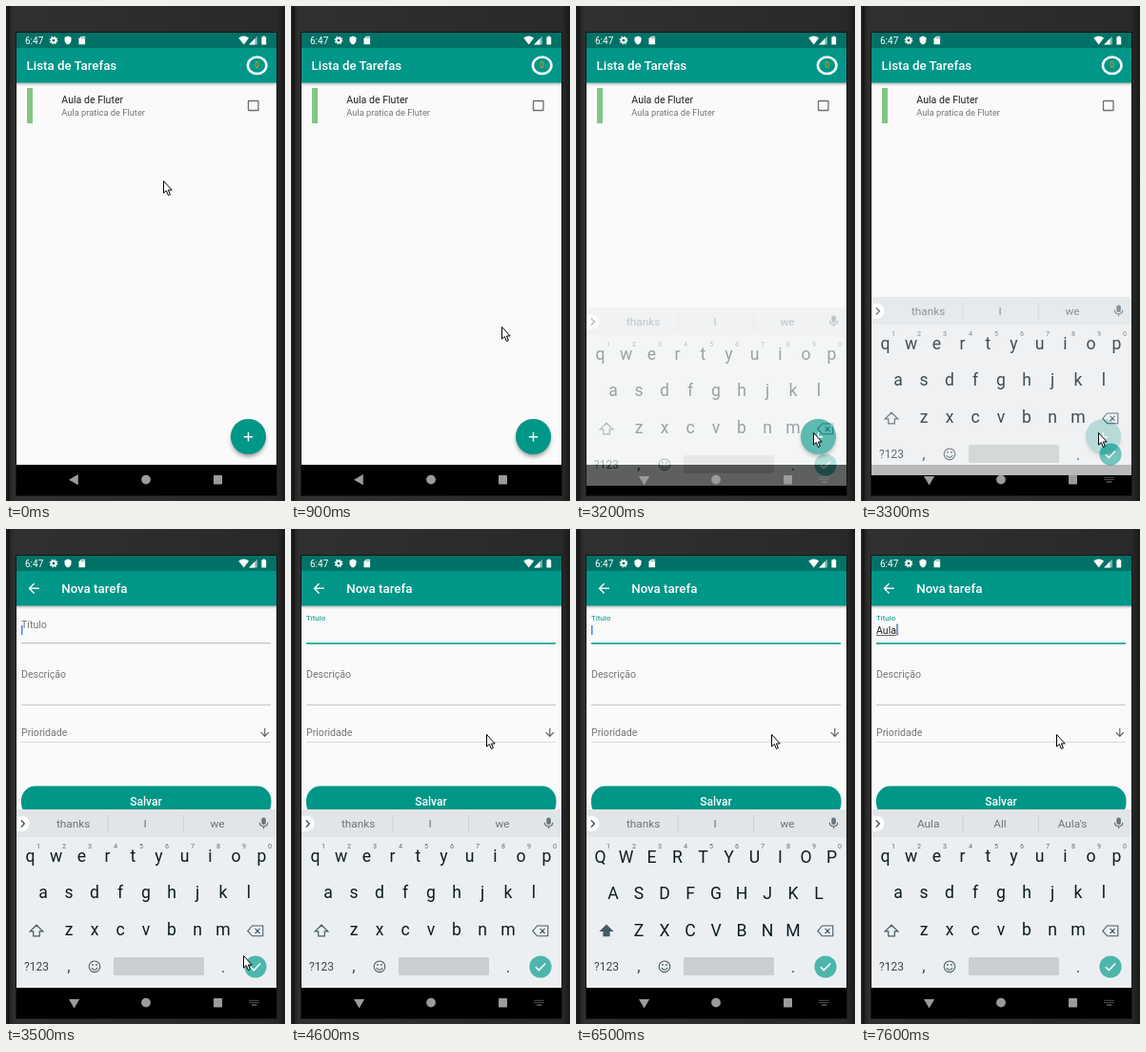
An HTML page for the animation above (8 s loop, 293x519 px).

```html
<!DOCTYPE html>
<html lang="pt">
<head>
<meta charset="utf-8">
<title>Lista de Tarefas</title>
<style>
html, body { margin: 0; width: 100%; height: 100%; overflow: hidden; background: #2a2a2a; }
svg { display: block; width: 100vw; height: 100vh; font-family: Roboto, "Noto Sans", sans-serif; }
.mid { text-anchor: middle; }
.med { font-weight: 500; }
.line { fill: none; stroke-linecap: butt; }
.anim { animation: 8s step-end infinite; }

/* 1% of the loop is 80 ms */
#pointer { animation-name: pointer; }
@keyframes pointer {
  0% { transform: translate(165px, 183px); }
  5% { transform: translate(165px, 183px); animation-timing-function: steps(3, start); }
  8.75% { transform: translate(185px, 237px); animation-timing-function: steps(3, start); }
  12.5% { transform: translate(221px, 336px); animation-timing-function: steps(3, start); }
  16.25% { transform: translate(242px, 392px); animation-timing-function: steps(4, start); }
  21.25% { transform: translate(249px, 447px); }
  50% { transform: translate(249px, 447px); animation-timing-function: steps(5, start); }
  56.25%, 100% { transform: translate(205px, 215px); }
}
#board { animation-name: board; }
@keyframes board {
  0% { opacity: 0; transform: translateY(22px); }
  40% { opacity: .4; transform: translateY(22px); }
  41.25% { opacity: .78; transform: translateY(11px); }
  42.5% { opacity: .95; transform: translateY(3px); }
  43.75%, 100% { opacity: 1; transform: none; }
}
#form { animation-name: form; }
@keyframes form {
  0% { opacity: 0; transform: translateY(20px); }
  42.5% { opacity: .5; transform: translateY(20px); }
  43.75%, 100% { opacity: 1; transform: none; }
}
.back-up { animation-name: before-board; }
.back-down { animation-name: after-board; }
@keyframes before-board { 0% { opacity: 1; } 40%, 100% { opacity: 0; } }
@keyframes after-board { 0% { opacity: 0; } 40%, 100% { opacity: 1; } }
.idle { animation-name: before-focus; }
.focus { animation-name: after-focus; }
@keyframes before-focus { 0% { opacity: 1; } 45%, 100% { opacity: 0; } }
@keyframes after-focus { 0% { opacity: 0; } 45%, 100% { opacity: 1; } }
.lower { animation-name: lower; }
.upper { animation-name: upper; }
@keyframes lower { 0% { opacity: 1; } 81.25% { opacity: 0; } 82.5%, 100% { opacity: 1; } }
@keyframes upper { 0% { opacity: 0; } 81.25% { opacity: 1; } 82.5%, 100% { opacity: 0; } }
#caret { animation-name: caret; }
@keyframes caret {
  0%, 51.25%, 63.75%, 75% { opacity: 1; }
  45%, 57.5%, 70%, 82.5%, 100% { opacity: 0; }
}
#tallcaret { animation-name: tallcaret; }
@keyframes tallcaret {
  0% { opacity: 0; transform: translateX(23px); }
  82.5% { opacity: 1; transform: translateX(23px); }
  83.75% { opacity: 1; transform: translateX(29px); }
  90% { opacity: 0; transform: translateX(29px); }
  92.5% { opacity: 1; transform: translateX(31.6px); }
  95%, 100% { opacity: 1; transform: translateX(37.4px); }
}
.t1 { animation-name: t1; }
.t2 { animation-name: t2; }
.t3 { animation-name: t3; }
.t4 { animation-name: t4; }
@keyframes t1 { 0% { opacity: 0; } 82.5% { opacity: 1; } 83.75%, 100% { opacity: 0; } }
@keyframes t2 { 0% { opacity: 0; } 83.75% { opacity: 1; } 92.5%, 100% { opacity: 0; } }
@keyframes t3 { 0% { opacity: 0; } 92.5% { opacity: 1; } 95%, 100% { opacity: 0; } }
@keyframes t4 { 0% { opacity: 0; } 95%, 100% { opacity: 1; } }
.hints { animation-name: hints; }
@keyframes hints { 0% { opacity: 1; } 92.5%, 100% { opacity: 0; } }
</style>
</head>
<body>
<svg viewBox="0 0 293 519" preserveAspectRatio="none">
  <defs>
    <clipPath id="screen"><rect x="11" y="28" width="273" height="485"/></clipPath>
    <linearGradient id="bezel"><stop stop-color="#1c1c1c"/><stop offset=".03" stop-color="#303030"/><stop offset=".97" stop-color="#292929"/><stop offset="1" stop-color="#1a1a1a"/></linearGradient>
    <linearGradient id="drop" x2="0" y2="1"><stop stop-opacity=".28"/><stop offset="1" stop-opacity="0"/></linearGradient>
    <filter id="soft" x="-40%" y="-40%" width="180%" height="180%"><feGaussianBlur stdDeviation="2.2"/></filter>
  </defs>

  <rect width="293" height="519" fill="url(#bezel)"/>
  <rect x="2" width="1.5" height="519" fill="#131313"/>
  <rect x="10" y="27" width="275" height="487" fill="#161616"/>

  <g clip-path="url(#screen)">
    <rect x="11" y="44" width="273" height="437" fill="#fafafa"/>

    <!-- task list -->
    <rect x="11" y="80" width="273" height="4" fill="url(#drop)"/>
    <rect x="11" y="44" width="273" height="36.5" fill="#009688"/>
    <text class="med" x="21.6" y="67" font-size="13.3" fill="#fff">Lista de Tarefas</text>
    <ellipse class="line" cx="263.7" cy="62.3" rx="9.8" ry="8.8" stroke="#fff" stroke-width="2.5"/>
    <path d="M263.5 52.5v2" stroke="#b9dcd8"/>
    <text class="mid" x="263.7" y="65.2" font-size="8.4" fill="#ff9800">0</text>
    <rect x="22" y="86" width="6" height="37" fill="#81c784"/>
    <text x="58.3" y="102" font-size="10.6" fill="#212121">Aula de Fluter</text>
    <text x="58.3" y="115.2" font-size="9.3" fill="#757575">Aula pratica de Fluter</text>
    <rect class="line" x="254.5" y="99.5" width="10.5" height="10" rx=".6" stroke="#6f6f6f" stroke-width="1.3"/>
    <circle cx="254.5" cy="454.5" r="18" opacity=".38" filter="url(#soft)"/>
    <circle cx="254.5" cy="451.5" r="18.6" fill="#009688"/>
    <path d="M249.8 451.7h9.4M254.5 447v9.4" stroke="#fff" stroke-width="1.4"/>

    <!-- new task -->
    <g id="form" class="anim">
      <rect x="11" y="44" width="273" height="437" fill="#fafafa"/>
      <rect x="11" y="80" width="273" height="4" fill="url(#drop)"/>
      <rect x="11" y="44" width="273" height="36.5" fill="#009688"/>
      <path class="line" d="M34.8 62.3h-10M29.6 57.2l-5.1 5.1 5.1 5.1" stroke="#fff" stroke-width="1.4"/>
      <text class="med" x="58.2" y="67" font-size="13.3" fill="#fff">Nova tarefa</text>
      <g class="anim idle">
        <text x="16" y="104" font-size="10.6" fill="#757575">Título</text>
        <path d="M16 119.7h262" stroke="#b4b4b4"/>
      </g>
      <g class="anim focus">
        <text x="16" y="96" font-size="8" fill="#009688">Título</text>
        <path d="M16 120h262" stroke="#009688" stroke-width="1.6"/>
      </g>
      <g font-size="10.6" fill="#757575">
        <text x="16" y="155.6">Descrição</text>
        <text x="16" y="216.8">Prioridade</text>
      </g>
      <path d="M16 184.5h262" stroke="#c6c6c6"/>
      <path d="M16 223.5h262" stroke="#dadada"/>
      <path class="line" d="M271.8 208.8v8.4M267.7 213.2l4.1 4.1 4.1-4.1" stroke="#616161" stroke-width="1.2"/>
      <rect x="16" y="269.5" width="262.5" height="33" rx="15" fill="#009688"/>
      <text class="mid med" x="147" y="289.6" font-size="12" fill="#fff">Salvar</text>
      <g id="typed" font-size="10.6" fill="#212121"></g>
      <rect id="caret" class="anim" x="16" y="101" width="1.5" height="10" fill="#4285f4"/>
      <rect id="tallcaret" class="anim" x="0" y="99.5" width="1.2" height="12" fill="#34508a"/>
    </g>

    <!-- status bar -->
    <rect x="11" y="28" width="273" height="16" fill="#007166"/>
    <text x="20" y="39.6" font-size="10" fill="#fff">6:47</text>
    <g fill="#fff">
      <circle class="line" cx="50" cy="36" r="2.4" stroke="#fff" stroke-width="1.8"/>
      <circle class="line" cx="50" cy="36" r="3.8" stroke="#fff" stroke-width="1.2" stroke-dasharray="1.5 1.48"/>
      <path d="M65 31.6l3.5 1.5v2.7q0 3.3-3.5 4.8-3.5-1.5-3.5-4.8v-2.7z"/>
      <path d="M79 31.7h4.1v8.5h-6.6v-6z"/>
      <path d="M79.4 32.4v1.8M80.9 32.4v1.8M82.3 32.4v1.8" stroke="#007166" stroke-width=".6"/>
      <path d="M244.3 33.6q5.4-4.2 10.8 0l-5.4 6.8z"/>
      <path d="M264 31.6v8.8h-8.8z" opacity=".45"/>
      <path d="M261.5 34.1v6.3h-6.3z"/>
      <path d="M268.4 32.4h1.4v-1h2v1h1.4v8.2h-4.8z"/>
    </g>

    <rect x="11" y="481" width="273" height="32"/>

    <!-- keyboard -->
    <g id="board" class="anim">
      <rect x="11" y="294" width="273" height="187" fill="#eceff1"/>
      <rect x="11" y="294" width="273" height="29" fill="#e1e5e8"/>
      <path d="M107 300v18M186.5 300v18" stroke="#c6cccf" stroke-width=".8"/>
      <path d="M11 301h5.5a8 8 0 0 1 0 16H11z" fill="#fff"/>
      <path class="line" d="M15.8 305.4l3.5 3.6-3.5 3.6" stroke="#37474f" stroke-width="1.3"/>
      <g fill="none" stroke="#69767d" stroke-width="1.2">
        <rect x="268.9" y="303" width="3.4" height="6.4" rx="1.7" fill="#69767d"/>
        <path d="M266.4 307.8q0 4 4.2 4t4.2-4M270.6 311.8v2.4"/>
      </g>
      <g id="hints" class="mid" font-size="11.8" fill="#6b747a"></g>
      <g id="digits" class="mid" font-size="7.2" fill="#5f6d75"></g>
      <g id="keys" class="mid" font-size="17.6" fill="#0c1c23"></g>
      <path class="anim lower line" d="M32 415.2l6.8 6.6h-3.5v5h-6.6v-5h-3.5z" stroke="#455a64" stroke-width="1.2"/>
      <path class="anim upper" d="M32 414.5l7.6 7.6h-4v5.2h-7.2v-5.2h-4z" fill="#455a64"/>
      <g class="line" stroke="#455a64" stroke-width="1.1">
        <path d="M258.6 416h11.2v10.8h-11.2l-4.8-5.4zM261.6 418.8l5 5.2M266.6 418.8l-5 5.2"/>
        <circle cx="93" cy="458.8" r="5.8"/>
        <path d="M89.8 460.2q3.2 4.2 6.4 0"/>
      </g>
      <path d="M91 456v1.8M95 456v1.8" stroke="#455a64" stroke-width="1.4"/>
      <g class="mid" fill="#37474f">
        <text x="32" y="463" font-size="12">?123</text>
        <text x="66" y="464" font-size="17">,</text>
        <text x="228" y="465" font-size="17">.</text>
      </g>
      <rect x="113" y="449" width="95" height="19" rx="1.5" fill="#cbced0"/>
      <circle cx="262" cy="459" r="11.6" fill="#4db6ac"/>
      <path class="line" d="M256.9 459.2l3.4 3.4 6.9-7.1" stroke="#fff" stroke-width="1.5"/>
    </g>

    <!-- navigation bar -->
    <g fill="#9b9b9b">
      <path class="anim back-up" d="M66 496.7l9.8-5.6v11.2z"/>
      <path class="anim back-down" d="M66 493h11.2l-5.6 9.6z"/>
      <circle cx="147" cy="496.6" r="4.9"/>
      <rect x="218" y="492" width="9" height="9.4" rx=".6"/>
      <g class="anim back-down line" stroke="#8a8a8a" stroke-width="1">
        <path d="M255.5 494.3h10.5M255.5 496.6h10.5" stroke-dasharray="1.2 .9"/>
        <path d="M258 499h5.4"/>
      </g>
    </g>
  </g>

  <path id="pointer" class="anim" d="M.5.5v12.6l2.8-2.6 2.1 5 2-.9-2-4.6h3.8z" fill="#fff" stroke="#000" stroke-linejoin="round"/>
</svg>
<script>
const byId = id => document.getElementById(id);
const label = (x, y, str, cls = '') => `<text x="${x}" y="${y}" class="${cls}">${str}</text>`;

const rows = [['qwertyuiop', 25.5, 349], ['asdfghjkl', 39, 387], ['zxcvbnm', 66, 426]];
const step = 27;
const keys = (upper, drop) => rows.map(([row, x, y]) =>
  [...(upper ? row.toUpperCase() : row)].map((c, i) => label(x + i * step, y + drop, c)).join('')).join('');
byId('keys').innerHTML =
  `<g class="anim lower">${keys(false, 0)}</g><g class="anim upper">${keys(true, 1)}</g>`;

byId('digits').innerHTML =
  [...'1234567890'].map((d, i) => label(34 + i * step, 335, d)).join('');

const hints = (words, cls) => words.map((w, i) => label([70.7, 146, 222][i], 313, w, 'anim ' + cls)).join('');
byId('hints').innerHTML =
  hints(['thanks', 'I', 'we'], 'hints') + hints(['Aula', 'All', "Aula's"], 't4');

// each typed prefix with its composing underline
const ends = [22.8, 28.7, 31.2, 37];
byId('typed').innerHTML = ends.map((end, i) =>
  `<g class="anim t${i + 1}">${label(16, 109.6, 'Aula'.slice(0, i + 1))}` +
  `<path d="M16 111.5H${end}" stroke="#424242" stroke-width=".8"/></g>`).join('');
</script>
</body>
</html>
```
